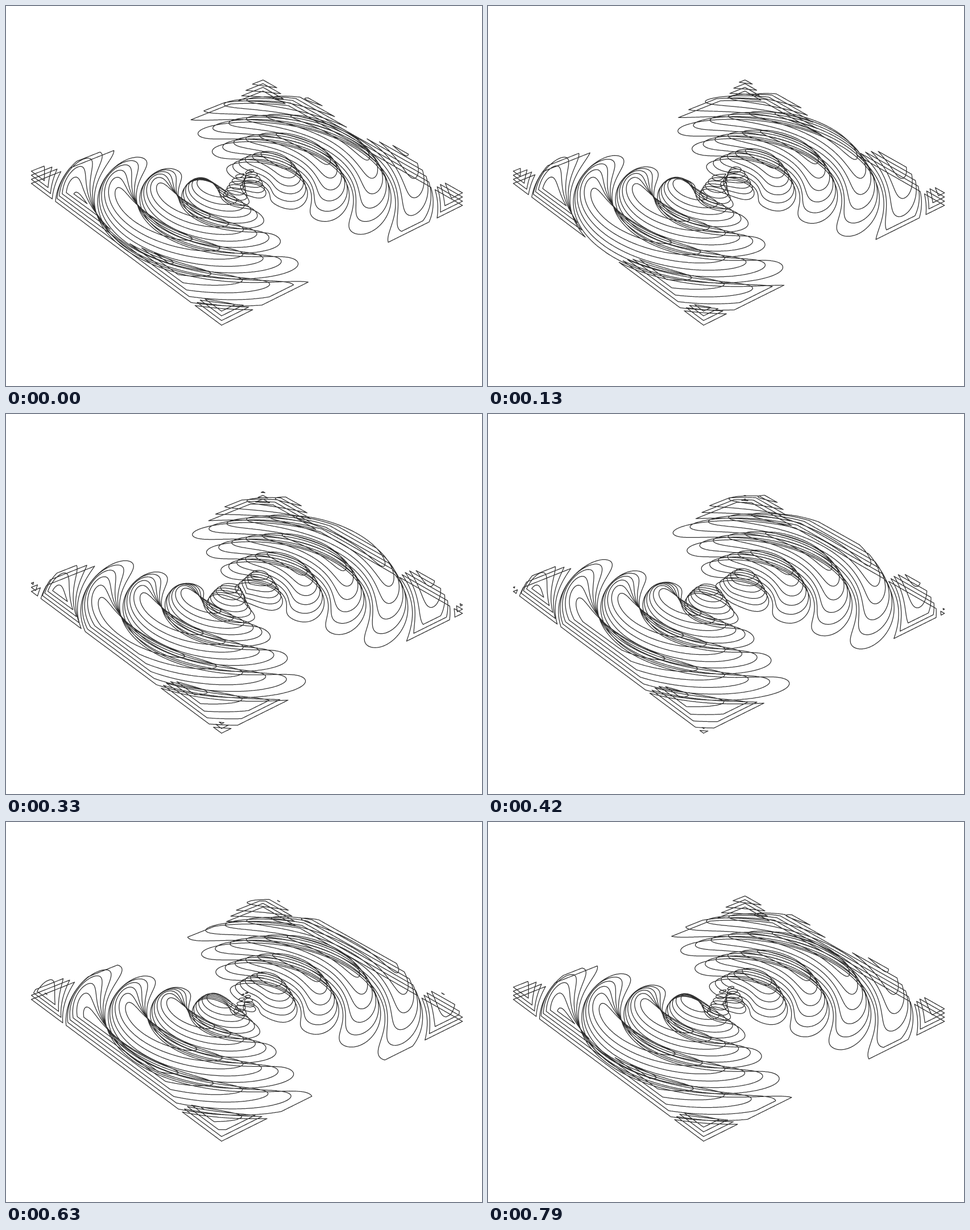
Recreate the animation shown at these times as an HTML page with a canvas. Size 837 px wide and 669 px high, loop 830 ms.

```html
<!DOCTYPE html>
<html lang="en">
<head>
<meta charset="utf-8">
<title>Stacked wave contours</title>
<style>
  html, body { margin: 0; width: 100%; height: 100%; overflow: hidden; background: #fff; }
  canvas { display: block; width: 837px; height: 669px; }
</style>
</head>
<body>
<canvas id="stage" width="837" height="669"></canvas>
<script>
const ctx = document.getElementById('stage').getContext('2d');

const LOOP = 830, STEPS = 20;
const N = 240;              // grid cells per side
const W = N + 3;            // grid points per side, with a border of zeros
const WAVE = 11.53;         // radial wave number
const START = 0.15;         // radius of the innermost valley at time zero
const LEVELS = 6, LOWEST = 0.29, SPACING = 0.119;
const LIFT = 7.2;           // screen height between two slices

// Corners of the lowest slice on screen: left, front, right, back
const corners = [[44.5, 312.3], [379, 562], [802.7, 351], [452, 149.7]];

// Perspective map of the unit square onto the four corners
function makeProjection([[x0, y0], [x1, y1], [x2, y2], [x3, y3]]) {
  const ax = x1 - x2, ay = y1 - y2, bx = x3 - x2, by = y3 - y2;
  const sx = x0 - x1 + x2 - x3, sy = y0 - y1 + y2 - y3;
  const det = ax * by - bx * ay;
  const g = (sx * by - bx * sy) / det, h = (ax * sy - sx * ay) / det;
  const a = x1 - x0 + g * x1, b = x3 - x0 + h * x3;
  const d = y1 - y0 + g * y1, e = y3 - y0 + h * y3;
  return (u, v, lift) => {
    const w = 1 + g * u + h * v;
    return [(a * u + b * v + x0) / w, (d * u + e * v + y0 - lift) / w];
  };
}
const project = makeProjection(corners);

// Grid coordinate in 0..1; border points sit on the rim
const coord = i => Math.min(1, Math.max(0, (i - 1) / N));
const isBorder = i => i < 1 || i > N + 1;

// Signed square of the surface height, smooth across the valleys
function sampleWave(phase) {
  const f = new Float32Array(W * W);
  for (let j = 0; j < W; j++) {
    for (let i = 0; i < W; i++) {
      if (isBorder(i) || isBorder(j)) continue;
      const p = 2 * coord(i) - 1, q = 2 * coord(j) - 1;
      const rr = p * p + q * q;
      if (rr < 1e-9) continue;
      f[j * W + i] = Math.sin(WAVE * (Math.sqrt(rr) - START) - phase) * q * q / rr;
    }
  }
  return f;
}

// Marching squares for the outline of sign * f > level
function addContour(path, f, sign, level, lift) {
  const cross = [];
  const edge = (i, j, va, k, l, vb) => {
    if ((va > 0) === (vb > 0)) return;
    const t = va / (va - vb);
    const u = coord(i) + (coord(k) - coord(i)) * t;
    const v = coord(j) + (coord(l) - coord(j)) * t;
    cross.push(project(u, v, lift));
  };
  for (let j = 0; j < W - 1; j++) {
    for (let i = 0; i < W - 1; i++) {
      const n = j * W + i;
      const a = sign * f[n] - level, b = sign * f[n + 1] - level;
      const c = sign * f[n + W + 1] - level, d = sign * f[n + W] - level;
      const inside = (a > 0) + (b > 0) + (c > 0) + (d > 0);
      if (inside === 0 || inside === 4) continue;
      cross.length = 0;
      edge(i, j, a, i + 1, j, b);
      edge(i + 1, j, b, i + 1, j + 1, c);
      edge(i + 1, j + 1, c, i, j + 1, d);
      edge(i, j + 1, d, i, j, a);
      for (let k = 0; k + 1 < cross.length; k += 2) {
        path.moveTo(cross[k][0], cross[k][1]);
        path.lineTo(cross[k + 1][0], cross[k + 1][1]);
      }
    }
  }
}

function buildPath(step) {
  const path = new Path2D();
  const f = sampleWave(Math.PI * step / STEPS);
  for (let n = 0; n < LEVELS; n++) {
    const level = (LOWEST + SPACING * n) ** 2;
    addContour(path, f, 1, level, n * LIFT);
    addContour(path, f, -1, level, n * LIFT);
  }
  return path;
}

// 24 steps per second, each start rounded to 10 ms
const stepStart = i => Math.round(i * 100 / 24) * 10;
function stepAt(ms) {
  let i = 0;
  while (i < STEPS - 1 && stepStart(i + 1) <= ms) i++;
  return i;
}

const paths = [];
let shown = -1;

function draw(step) {
  paths[step] = paths[step] || buildPath(step);
  ctx.fillStyle = '#fff';
  ctx.fillRect(0, 0, 837, 669);
  ctx.strokeStyle = '#303030';
  ctx.lineWidth = 1.25;
  ctx.lineCap = 'round';
  ctx.stroke(paths[step]);
}

let origin = null;
function tick(now) {
  if (origin === null) origin = now;
  const step = stepAt(Math.max(0, now - origin) % LOOP);
  if (step !== shown) draw(shown = step);
  requestAnimationFrame(tick);
}

draw(0);
requestAnimationFrame(tick);
</script>
</body>
</html>
```
